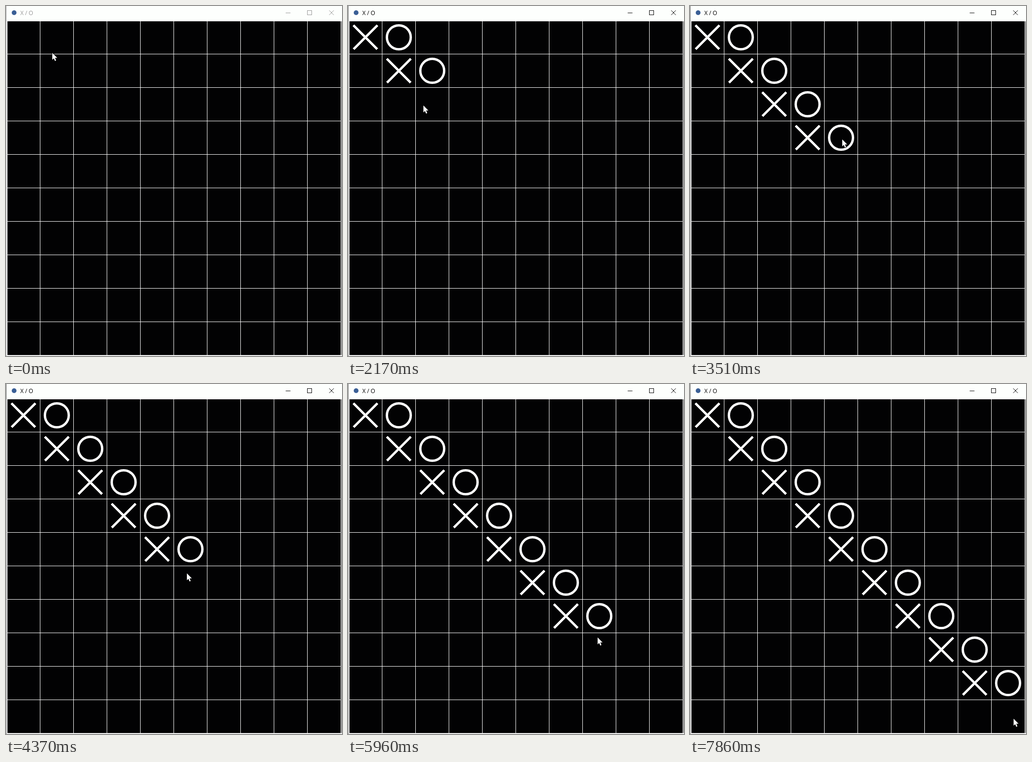
Animation, 704 px wide and 732 px high, one loop 8 s. Source, as an HTML page:

```html
<!DOCTYPE html>
<html lang="en">
<head>
<meta charset="utf-8">
<title>X / O</title>
<style>
  html, body { margin: 0; width: 100%; height: 100%; overflow: hidden; background: #fff; }
  svg { display: block; }
  .crisp { shape-rendering: crispEdges; }
  #chrome { color: #999; }
  #chrome.active { color: #000; }
  #edge { fill: #aaa; }
  .active #edge { fill: #6a6a6a; }
  text { font: 12px "Open Sans", "Noto Sans", sans-serif; fill: currentColor; }
</style>
</head>
<body>
<svg width="704" height="732" viewBox="0 0 704 732">
  <rect width="704" height="732" fill="#fff"/>
  <rect class="crisp" width="704" height="30" fill="#fdfffd"/>
  <rect class="crisp" x="3" y="32" width="700" height="698" fill="#020203"/>
  <rect class="crisp" y="731" width="704" height="1" fill="#eee"/>
  <g id="chrome">
    <rect id="edge" class="crisp" width="1" height="732"/>
    <circle cx="17" cy="14" r="5" fill="#3a5f95"/>
    <text x="30" y="19">X / O</text>
    <g fill="none" stroke="currentColor">
      <path class="crisp" d="M586 14.5h10M631.5 9.5h9v9h-9z"/>
      <path d="M677.2 9.2l9.6 9.6M686.8 9.2l-9.6 9.6"/>
    </g>
  </g>
  <path id="grid" class="crisp" stroke="#fff" fill="none"/>
  <g id="marks" stroke="#fff" stroke-width="5" fill="none"></g>
  <path id="cursor" d="M0 0V14.4L3.3 11.4L5.6 17L8 16L5.7 10.6H10.4Z"
        fill="#fff" stroke="#020203" stroke-width="2" stroke-linejoin="round" paint-order="stroke"/>
</svg>
<script>
const LOOP = 8000, CELL = 70, ROWS = 9;
const get = id => document.getElementById(id);

// One entry per row: when X and O are clicked, and how far the pointer sways off centre
const xTimes = [750, 1580, 2310, 3130, 3890, 4650, 5410, 6170, 7000];
const oTimes = [1200, 1930, 2660, 3505, 4170, 4930, 5860, 6520, 7340];
const sway = [-2, -18, -7, 3, -7, -4, -3, 1, 9];

const marks = [];
function addMark(time, d, className) {
  const el = document.createElementNS("http://www.w3.org/2000/svg", "path");
  el.setAttribute("d", d);
  el.setAttribute("class", className);
  get("marks").append(el);
  marks.push({ el, time });
}

// Pointer moves: from X to the O cell beside it, then down to the next X
const home = { x: 97, y: 98 };
const moves = [{ start: 10, end: 410, x: 40, y: 80 }];

for (let row = 0; row < ROWS; row++) {
  const left = 36.5 + CELL * row, mid = left + CELL, y = 65.5 + CELL * row;
  const xAt = xTimes[row], oAt = oTimes[row];
  addMark(xAt, `M${left - 25} ${y - 25}l50 50m0 -50l-50 50`, "crisp");
  addMark(oAt, `M${mid - 25} ${y}a25 25 0 1 1 50 0a25 25 0 1 1 -50 0z`, "");

  const last = row === ROWS - 1;
  const drop = last ? 84 : 76.5 - 3.8 * row;
  const rest = (last ? 7800 : xTimes[row + 1]) - 150;
  const x = mid + sway[row] - 0.5;
  moves.push({ start: xAt + 10, end: oAt - 120, x, y: y + 9.5 - 2.8 * row });
  moves.push({ start: oAt, end: rest, x, y: y + drop });
}
moves.push({ start: 7770, end: 7860, x: 678, y: 700 });

let lines = "";
for (let i = 1; i <= 10; i++) {
  lines += `M${CELL * i + 1.5} 32V731M3 ${CELL * i + 30.5}H702`;
}
get("grid").setAttribute("d", lines);

// Quick start, soft stop
function ease(f) {
  const u = f ** 0.6;
  return u * u * (3 - 2 * u);
}

function pointerAt(t) {
  let { x, y } = home;
  for (const move of moves) {
    if (t <= move.start) break;
    const k = ease(Math.min(1, (t - move.start) / (move.end - move.start)));
    x += (move.x - x) * k;
    y += (move.y - y) * k;
  }
  return [Math.round(x), Math.round(y)];
}

function draw(t) {
  get("chrome").classList.toggle("active", t >= xTimes[0]);
  for (const { el, time } of marks) {
    el.setAttribute("visibility", t >= time ? "visible" : "hidden");
  }
  get("cursor").setAttribute("transform", `translate(${pointerAt(t)})`);
}

const begin = performance.now();
function tick() {
  draw((performance.now() - begin) % LOOP);
  requestAnimationFrame(tick);
}
draw(0);
requestAnimationFrame(tick);
</script>
</body>
</html>
```
